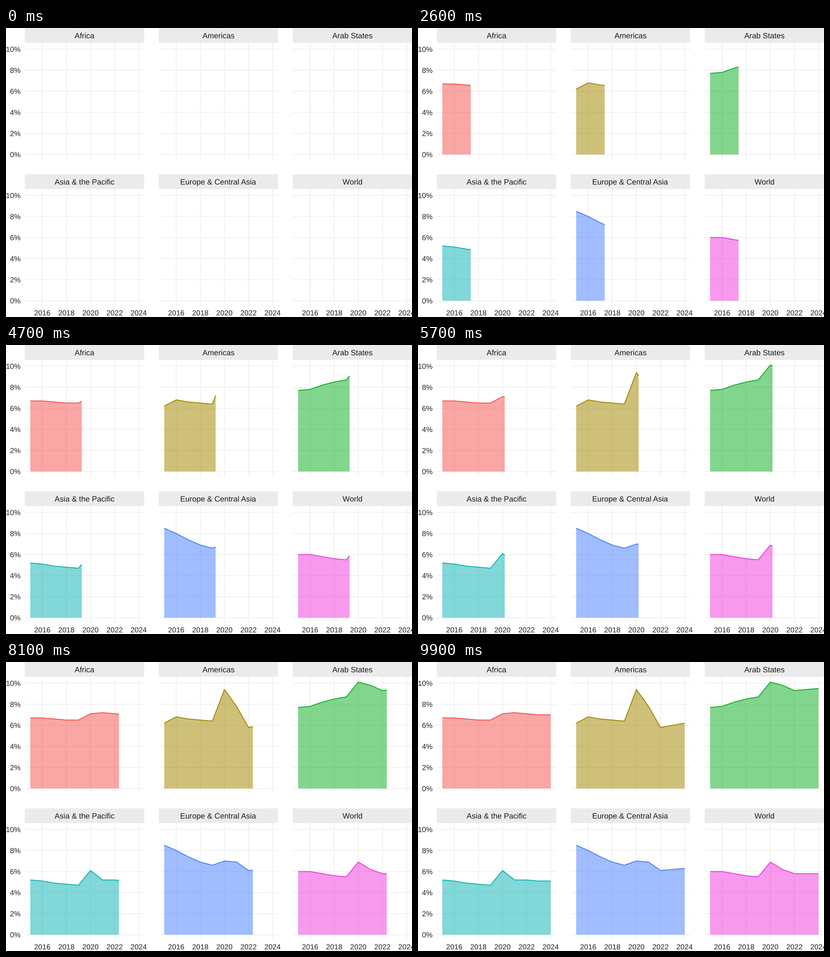
Recreate the animation shown at these times as a matplotlib script. Size 885x632 px, loop 10000 ms.

```python
import numpy as np
import matplotlib.pyplot as plt
from matplotlib.animation import FuncAnimation
from matplotlib.patches import PathPatch, Polygon, Rectangle
from matplotlib.path import Path
from matplotlib.textpath import TextPath

W, H, DPI = 885, 632, 72
FRAMES, INTERVAL = 100, 100

plt.rcParams["font.family"] = "Liberation Sans"

# Rates at the turning points; the years between follow from easing
YEARS = np.arange(2015, 2025)
KEY_YEARS = [2015, 2016, 2019, 2020, 2021, 2022, 2024]
REGIONS = [
    ("Africa", "#f55853", [6.7, 6.7, 6.5, 7.1, 7.2, 7.1, 7.0]),
    ("Americas", "#a48800", [6.2, 6.8, 6.4, 9.4, 7.8, 5.8, 6.2]),
    ("Arab States", "#13b029", [7.7, 7.8, 8.7, 10.1, 9.8, 9.3, 9.5]),
    ("Asia & the Pacific", "#13b4b7", [5.2, 5.1, 4.7, 6.1, 5.2, 5.2, 5.1]),
    ("Europe & Central Asia", "#4c83ff", [8.5, 8.0, 6.6, 7.0, 6.9, 6.1, 6.3]),
    ("World", "#f03fdc", [6.0, 6.0, 5.5, 6.9, 6.2, 5.8, 5.8]),
]

# Panel geometry in pixels, with a 5% margin around the data range
PANEL_W, PANEL_H, STRIP_H = 260, 255.8, 32.2
LEFT, BOTTOM = 41.1, 288.2
STEP_X, STEP_Y = 291.9, 319.8
PER_YEAR = PANEL_W / 9.9
PER_PCT = PANEL_H / (10.1 * 1.1)

fig = plt.figure(figsize=(W / DPI, H / DPI), dpi=DPI, facecolor="white")
ax = fig.add_axes([0, 0, 1, 1])
ax.set_xlim(0, W)
ax.set_ylim(H, 0)
ax.axis("off")


def yearly_rates(keys):
    """One rate per year, gaps between key years eased out, to 0.1 point."""
    pos = np.interp(YEARS, KEY_YEARS, np.arange(len(KEY_YEARS)))
    whole = np.floor(pos)
    eased = whole + 1 - (1 - (pos - whole)) ** 1.4
    return np.round(np.interp(eased, np.arange(len(keys)), keys), 1)


def label(x, y, text, size, color, align=0.5):
    """Text as outlines, so it can sit between whole pixels."""
    glyphs = TextPath((0, 0), text, size=size)
    box = glyphs.get_extents()
    shift = [x - box.x0 - align * box.width, y]
    outline = Path(glyphs.vertices * [1, -1] + shift, glyphs.codes)
    ax.add_patch(PathPatch(outline, facecolor=color, lw=0, zorder=4, snap=False))


class Panel:
    def __init__(self, index, name, color, keys):
        row, col = divmod(index, 3)
        self.rates = yearly_rates(keys)
        self.left = LEFT + col * STEP_X
        self.bottom = BOTTOM + row * STEP_Y
        self.draw_frame(name, row, col)
        self.area = ax.add_patch(Polygon(np.zeros((3, 2)), facecolor=color,
                                         alpha=0.53, lw=0, zorder=2, snap=False))
        self.line, = ax.plot([], [], color=color, lw=2, zorder=3, snap=False,
                             solid_capstyle="butt", solid_joinstyle="round")

    def x(self, year):
        return self.left + (year - 2015 + 0.45) * PER_YEAR

    def y(self, pct):
        return self.bottom - (pct + 0.505) * PER_PCT

    def draw_frame(self, name, row, col):
        top = self.bottom - PANEL_H
        right = self.left + PANEL_W
        grid = dict(color="#f1f1f1", lw=2, zorder=1, solid_capstyle="butt", snap=False)
        ax.add_patch(Rectangle((self.left, top - STRIP_H), PANEL_W, STRIP_H,
                               facecolor="#ebebeb", lw=0, zorder=1.5, snap=False))
        label(self.left + PANEL_W / 2, top - 9.9, name, 16.8, "#1a1a1a")
        for pct in range(0, 11, 2):
            y = self.y(pct)
            ax.plot([self.left, right], [y, y], **grid)
            if col == 0:
                label(31.2, y + 5.8, f"{pct}%", 16, "#222222", align=1)
        for year in range(2016, 2025, 2):
            x = self.x(year)
            ax.plot([x, x], [top, self.bottom], **grid)
            if row == 1:
                label(x, 628.5, str(year), 16, "#222222")

    def reveal(self, now):
        past = YEARS < now
        years = np.append(YEARS[past], now)
        rates = np.append(self.rates[past], np.interp(now, YEARS, self.rates))
        xs, ys = self.x(years), self.y(rates)
        base = self.y(0)
        self.line.set_data(xs, ys)
        self.area.set_xy(np.column_stack([np.r_[xs[0], xs, xs[-1]],
                                          np.r_[base, ys, base]]))


panels = [Panel(i, *region) for i, region in enumerate(REGIONS)]


def update(frame):
    now = 2015 + 9 * frame / (FRAMES - 1)
    for panel in panels:
        panel.reveal(now)
        panel.line.set_visible(frame > 0)
        panel.area.set_visible(frame > 0)
    return [artist for p in panels for artist in (p.area, p.line)]


anim = FuncAnimation(fig, update, frames=FRAMES, interval=INTERVAL, repeat=True,
                     repeat_delay=0, blit=False)
plt.show()
```
